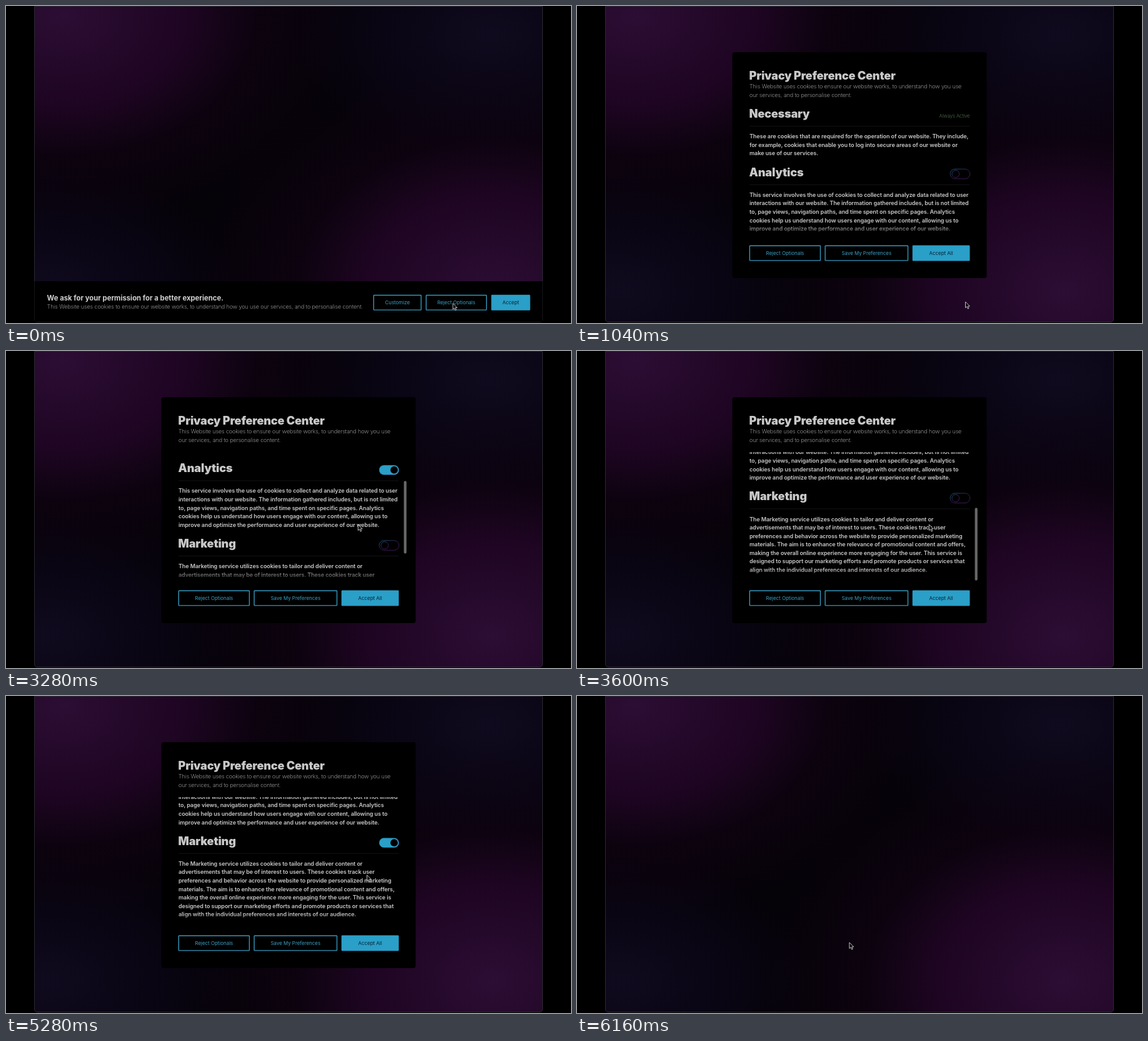
An HTML page that plays this animation: 904x508 px, repeating every 6.32 s.

```html
<!DOCTYPE html>
<html lang="en">
<head>
<meta charset="utf-8">
<title>Privacy preferences</title>
<style>
html, body { margin: 0; width: 100%; height: 100%; overflow: hidden; background: #000; }
#window {
  position: absolute; left: 45px; top: 0; width: 814px; height: 507px;
  box-sizing: border-box; border: 1px solid #2b2930; border-radius: 0 0 5px 5px;
  background:
    radial-gradient(ellipse 470px 340px at 45px 15px, #2c0d34, #1e0522 42%, #12031490 66%, #0000),
    radial-gradient(ellipse 480px 370px at 732px 456px, #2c0d34, #1e0522 42%, #12031490 66%, #0000),
    radial-gradient(ellipse 310px 200px at 725px 45px, #100a1e, #090513 55%, #0000),
    radial-gradient(ellipse 310px 200px at 20px 456px, #100a1e, #090513 55%, #0000),
    #050208;
}
svg { position: absolute; left: 0; top: 0; width: 904px; height: 508px; }
text { font: 200 9.04px/1 Inter, sans-serif; letter-spacing: -.01em; fill: #d0d0d0; white-space: pre; }
.title { font-size: 18.09px; font-weight: 900; font-variation-settings: "opsz" 14; fill: #c8c8c8; }
.lead { font-size: 11.3px; font-weight: 700; font-variation-settings: "opsz" 20; letter-spacing: 0; }
.strong { font-weight: 600; fill: #c8c8c8; }
.active { font-size: 7.91px; fill: #6f9a6c; text-anchor: end; }
.label { font-size: 7.91px; font-weight: 400; letter-spacing: 0; fill: #3ba1c6; text-anchor: middle; }
.button { fill: #000; stroke: #3696ba; stroke-width: 1.4; }
.filled .button { fill: #2a9fc8; stroke: #2a9fc8; }
.filled .label { fill: #06222e; }
</style>
</head>
<body>
<div id="window"></div>
<svg viewBox="0 0 904 508">
  <defs>
    <linearGradient id="edge" x2="1" y2="1">
      <stop stop-color="#175a70"/><stop offset=".5" stop-color="#33184e"/><stop offset="1" stop-color="#431858"/>
    </linearGradient>
    <linearGradient id="fade" gradientUnits="userSpaceOnUse" x1="0" x2="0" y1="349" y2="370">
      <stop stop-color="#fff"/><stop offset="1"/>
    </linearGradient>
    <mask id="view" maskUnits="userSpaceOnUse" x="270" y="162" width="365" height="205">
      <rect x="270" y="162" width="365" height="205" fill="url(#fade)"/>
    </mask>
  </defs>
  <g id="banner"></g>
  <g id="modal"></g>
  <path id="cursor" d="M0 0V9.6L2.2 7.6 3.8 11.2 5.5 10.4 3.9 7H6.9Z" fill="#050505" stroke="#ddd" stroke-width=".85" stroke-linejoin="round"/>
</svg>
<script>
const LOOP = 6320, STEP = 80, LINE = 13.58, SCROLL = 154.7;
const OPEN = 800, CLOSE = 6160;
const $ = id => document.getElementById(id);

const text = (cls, x, y, s) => `<text class="${cls}" x="${x}" y="${y}">${s}</text>`;
const lines = (cls, x, y, list) => list.map((s, i) => text(cls, x, y + i * LINE, s)).join('');

const buttons = [];
function button(label, x, y, w, filled) {
  const id = 'button' + buttons.length;
  buttons.push({ id, x, y, w, filled });
  return `<g class="${filled ? 'filled' : ''}">
    <rect id="${id}" class="button" x="${x + .8}" y="${y + .8}" width="${w - 1.6}" height="23.6" rx=".6"/>
    ${text('label', x + w / 2, y + 15.4, label)}</g>`;
}

const toggle = (id, y) => `<g id="${id}" stroke="url(#edge)">
  <rect x="597" y="${y - 7.8}" width="31.8" height="15.6" rx="7.8" fill="#2a9fc8"/>
  <circle cx="605.8" cy="${y}" r="5.9" fill="#000"/></g>`;

// y is the middle of the heading
const section = (name, y, extra, body) =>
  text('title', 275.6, y + 6.4, name) + extra +
  `<path d="M276 ${y + 20}H628.5" stroke="#191919" stroke-width=".8"/>` +
  lines('strong', 276, y + 39.6, body);

$('banner').innerHTML = `<path d="M45.5 441H858.5V502Q858.5 506.5 854 506.5H50Q45.5 506.5 45.5 502Z"/>` +
  text('lead', 65.6, 471.7, 'We ask for your permission for a better experience.') +
  text('', 65.6, 485.3, 'This Website uses cookies to ensure our website works, to understand how you use our services, and to personalise content.') +
  button('Customize', 587.5, 462.7, 77.5) +
  button('Reject Optionals', 671.5, 462.7, 98) +
  button('Accept', 776.3, 462.7, 62.5, true);

$('modal').innerHTML = `<rect x="248.5" y="74" width="407" height="362" rx="4"/>` +
  text('title', 275.6, 117.5, 'Privacy Preference Center') +
  lines('', 276, 132.1, [
    'This Website uses cookies to ensure our website works, to understand how you use',
    'our services, and to personalise content.']) +
  `<g mask="url(#view)"><g id="content">` +
  section('Necessary', 172.7, text('active', 628.6, 178.5, 'Always Active'), [
    'These are cookies that are required for the operation of our website. They include,',
    'for example, cookies that enable you to log into secure areas of our website or',
    'make use of our services.']) +
  section('Analytics', 266.3, toggle('analytics', 269.1), [
    'This service involves the use of cookies to collect and analyze data related to user',
    'interactions with our website. The information gathered includes, but is not limited',
    'to, page views, navigation paths, and time spent on specific pages. Analytics',
    'cookies help us understand how users engage with our content, allowing us to',
    'improve and optimize the performance and user experience of our website.']) +
  section('Marketing', 387, toggle('marketing', 389.9), [
    'The Marketing service utilizes cookies to tailor and deliver content or',
    'advertisements that may be of interest to users. These cookies track user',
    'preferences and behavior across the website to provide personalized marketing',
    'materials. The aim is to enhance the relevance of promotional content and offers,',
    'making the overall online experience more engaging for the user. This service is',
    'designed to support our marketing efforts and promote products or services that',
    'align with the individual preferences and interests of our audience.']) +
  `</g></g><rect id="thumb" x="636.6" width="4.2" height="116.5" rx="2.1" fill="#686868"/>` +
  button('Reject Optionals', 275.5, 383.5, 114.7) +
  button('Save My Preferences', 396.3, 383.5, 134) +
  button('Accept All', 536.6, 383.5, 92, true);

// time, x, y
const path = [
  [0, 715, 476.5], [80, 715, 476.5], [560, 621.5, 474], [1680, 621.5, 474],
  [2320, 544.7, 289.5], [2480, 548, 285], [2800, 609, 266], [3040, 609, 266],
  [3200, 563.3, 278], [3680, 563.3, 278], [4080, 611, 233], [4320, 611, 233],
  [4560, 599.7, 270], [5160, 599.7, 270], [5680, 435.8, 395], [LOOP, 435.8, 395]
];
const ramp = (t, a, b) => Math.min(1, Math.max(0, (t - a) / (b - a)));
const ease = p => p * p * (3 - 2 * p);

function pointer(t) {
  const i = path.findIndex(k => k[0] > t);
  const [a, x, y] = path[i - 1], [b, u, v] = path[i];
  const p = ease(ramp(t, a, b));
  return [x + (u - x) * p, y + (v - y) * p];
}

function setToggle(id, p) {
  const [pill, knob] = $(id).children;
  pill.setAttribute('fill-opacity', p);
  pill.setAttribute('stroke-opacity', 1 - p * .6);
  knob.setAttribute('cx', 605.8 + 15.2 * p);
  knob.setAttribute('stroke-opacity', 1 - p);
}

function draw(now) {
  const t = Math.floor(now % LOOP / STEP) * STEP;
  const open = t >= OPEN && t < CLOSE;
  $('banner').style.display = t < OPEN ? '' : 'none';
  $('modal').style.display = open ? '' : 'none';

  const [x, y] = pointer(t);
  $('cursor').setAttribute('transform', `translate(${x} ${y})`);
  for (const b of buttons) {
    const over = t > 0 && !b.filled && x > b.x && x < b.x + b.w && y > b.y && y < b.y + 25.2;
    $(b.id).style.fill = over ? '#151515' : '';
  }

  setToggle('analytics', ease(ramp(t, 2800, 3040)));
  setToggle('marketing', ease(ramp(t, 4240, 4480)));

  const scroll = t < 3280 ? 0 : t < 3360 ? 78.4 : 78.4 + (SCROLL - 78.4) * (1 - (1 - ramp(t, 3280, 3680)) ** 3);
  $('content').setAttribute('transform', `translate(0 ${-scroll})`);
  $('thumb').setAttribute('y', 163.5 + scroll * .57);
  $('thumb').setAttribute('opacity', t < 3280 ? 0 : 1 - ramp(t, 4080, 4320));
}

const start = performance.now();
(function frame() {
  draw(performance.now() - start);
  requestAnimationFrame(frame);
})();
</script>
</body>
</html>
```
